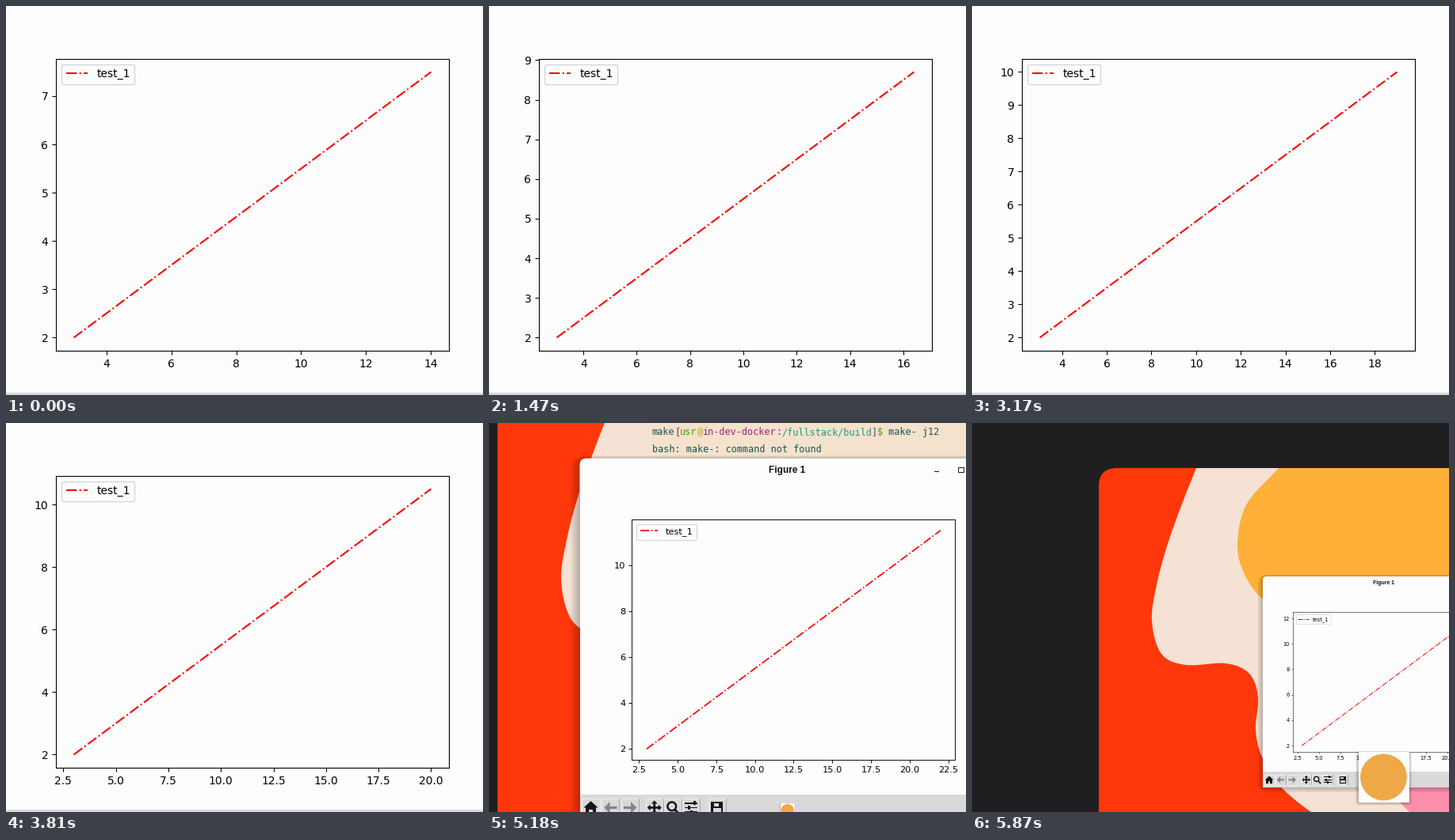
A matplotlib script for the animation above (5970 ms loop, 602 px wide and 492 px high).

```python
from itertools import count

import numpy as np
import matplotlib.pyplot as plt
from matplotlib.animation import FuncAnimation
from matplotlib.patches import (Annulus, Circle, FancyArrow, FancyBboxPatch,
                                Polygon, Rectangle)
from matplotlib.transforms import Affine2D

W, H, DPI = 602, 492, 100
LOOP, TICK = 5970, 30

PAPER, BAR, INK, GREY = "#fdfdfd", "#d9d9d9", "#141416", "#858585"
DARK, RED, CREAM, AMBER, PINK = "#1f1f22", "#fe380b", "#f5e2d5", "#feb038", "#fd8fab"
TERMINAL = "#f4e2cc"

STEP_START, STEP_MS = 38, 130.5
ZOOM_FROM, ZOOM_START, ZOOM_MS = 5180, 5127, 287.5

fig = plt.figure(figsize=(W / DPI, H / DPI), dpi=DPI, facecolor=DARK)


def layer(z):
    a = fig.add_axes([0, 0, 1, 1], zorder=z)
    a.set(xlim=(0, W), ylim=(H, 0))
    a.axis("off")
    return a


stage, front = layer(0), layer(2)
desk, term, win, icon = (Affine2D() for _ in range(4))
order = count(1)
backdrop = []


def add(patch, group, axes=stage):
    axes.add_patch(patch)
    patch.set_transform(group + axes.transData)
    patch.set_zorder(next(order))
    if group is not win:
        backdrop.append(patch)
    return patch


def rect(x, y, w, h, color, group, axes=stage):
    return add(Rectangle((x, y), w, h, fc=color, lw=0), group, axes)


def outline(x, y, w, h, color):
    add(Rectangle((x, y), w, h, fill=False, ec=color, lw=0.7), win)


def rounded(x, y, w, h, r, color, group, axes=stage, alpha=1):
    style = f"round,pad=0,rounding_size={r}"
    return add(FancyBboxPatch((x, y), w, h, boxstyle=style, fc=color, lw=0,
                              alpha=alpha), group, axes)


def shadow(x, y, w, h, r, group, spread, axes=stage):
    for d in spread * np.arange(1, 7) / 6:
        rounded(x - d, y - d * 0.3, w + 2 * d, h + 1.3 * d, r + d, "black",
                group, axes, alpha=0.04)


def smooth(points, n=12):
    """Catmull-Rom curve through the points."""
    p = np.array(points, float)
    p = np.vstack([2 * p[0] - p[1], p, 2 * p[-1] - p[-2]])
    t = np.linspace(0, 1, n)[:, None]
    return np.vstack([
        b + t * (c - a) / 2 + t**2 * (a - 2.5 * b + 2 * c - d / 2)
        + t**3 * (3 * (b - c) + d - a) / 2
        for a, b, c, d in zip(p, p[1:], p[2:], p[3:])])


def blob(points, top, bottom, color):
    """Region to the right of a smooth left edge."""
    edge = np.vstack([smooth(points), [(1100, bottom), (1100, top)]])
    return add(Polygon(edge, fc=color, lw=0), desk)


# wallpaper
rounded(0, 0, 1100, 800, 23, RED, desk)
blob([(123, 0), (104, 48), (86, 99), (73, 148), (67, 193), (79, 235), (110, 249),
      (160, 247), (190, 260), (201, 290), (198, 330), (205, 363), (225, 398),
      (268, 435), (330, 470)], 0, 470, CREAM)
blob([(227, 0), (187, 45), (175, 93), (182, 130), (207, 166), (260, 200)], 0, 200, AMBER)
pink = blob([(358, 395), (380, 423), (420, 460)], 395, 460, PINK)

# terminal, measured in line heights
rect(0, -2, 100, 1.4, PAPER, term)
rect(0, -0.6, 100, 33.3, TERMINAL, term)
rect(0, 31.9, 100, 0.7, "#dfe08a", term)

TEAL, GREEN, PLUM, SEA, OLIVE = "#1c5458", "#4f9a10", "#a0207c", "#1f9f80", "#b0a010"
PROMPT = [("[", PLUM), ("usr", GREEN), ("@", OLIVE), ("in-dev-docker", PLUM),
          (":", TEAL), ("/fullstack/build", SEA), ("]", PLUM), ("$", GREEN)]
LINES = [
    [("make", TEAL), *PROMPT, (" make- j12", TEAL)],
    [("bash: make-: command not found", TEAL)],
    [*PROMPT, (" make -j12", TEAL)],
    [("[  9%] ", TEAL), ("Built target core", GREEN)],
    [("[10%] ", TEAL), ("Built target util", GREEN)],
    [("[10%] ", TEAL), ("Built target main", GREEN)],
    [*PROMPT, (" ls", TEAL)],
    [("s 2", TEAL)],
    [("DV", TEAL)],
]


def label(s, color, **kw):
    return stage.text(0, 0, s, color=color, va="center", zorder=next(order), **kw)


words = []
for row, parts in enumerate(LINES):
    col = 0
    for s, color in parts:
        words.append((label(s, color, family="DejaVu Sans Mono"), row, col))
        col += len(s)
backdrop += [w[0] for w in words]

# figure window
shadow(0, 0, 640, 557, 10, win, 14)
rounded(0, 0, 640, 60, 10, PAPER, win)
rect(0, 30, 640, 487, PAPER, win)
rect(0, 516.5, 640, 40.5, BAR, win)
rect(544, 20, 7.5, 1.4, INK, win)
outline(581, 14, 7.5, 7.5, INK)
title = label("Figure 1", INK, family="Liberation Sans", weight="bold", ha="center")

# toolbar
CY = 537


def box(cx, x, y, w, h, color=INK):
    rect(cx + x, CY + y, w, h, color, win)


def arrow(cx, dx, dy, width, head, color=INK, back=0):
    add(FancyArrow(cx - back * dx, CY - back * dy, dx * (1 + back), dy * (1 + back),
                   width=width, head_width=head, head_length=head / 2,
                   length_includes_head=True, fc=color, lw=0), win)


home, prev, following = 17 + 30.2 * np.arange(3)
move, zoom, tune = 114.5 + 28.3 * np.arange(3)
save = 210.5
for cx in (home, prev, following, move, zoom, tune, save):
    outline(cx - 13.5, CY - 14, 27, 28, "#efefef")
    box(cx, 13.5, -14, 0.9, 28, "#a8a8a8")

add(Polygon([(home - 11, CY), (home, CY - 10), (home + 11, CY)], fc=INK, lw=0), win)
box(home, -8, 0, 5.5, 9)
box(home, 2.5, 0, 5.5, 9)
box(home, -3, 0, 6, 3)
for cx, dx in ((prev, -10), (following, 10)):
    arrow(cx, dx, 0, 4, 18, GREY, back=1)
for angle in np.arange(4) * np.pi / 2:
    arrow(move, 11 * np.cos(angle), 11 * np.sin(angle), 3.4, 9.5)
add(Annulus((zoom - 1.5, CY - 2), 8, 3, fc=INK, lw=0), win)
add(FancyArrow(zoom + 3, CY + 3, 7, 7, width=3.4, head_width=0, head_length=0,
               fc=INK, lw=0), win)
for i in range(3):
    y, knob = 7 * (i - 1), 5 * np.cos(2.4 * i)
    box(tune, -10, y - 1, 20, 2)
    box(tune, knob - 2, y - 3, 4, 6)
box(save, -9, -9, 18, 18)
box(save, -5, -7, 8, 5, BAR)
box(save, -6, 1, 12, 6, BAR)

# app tile, one unit wide
shadow(-0.5, -0.5, 1, 1, 0.02, icon, 0.06, front)
rect(-0.5, -0.5, 1, 1, PAPER, icon, front)
add(Circle((0, 0), 0.46, fc="#efa848", lw=0), icon, front)

# chart
ax = fig.add_axes([0.1, 0.1, 0.8, 0.8], zorder=1, facecolor=PAPER)
line, = ax.plot([], [], "r-.", label="test_1")


def restyle(s):
    ax.tick_params(labelsize=10 * s, length=3.5 * s, width=0.8 * s, pad=3.5 * s)
    for spine in ax.spines.values():
        spine.set_linewidth(0.8 * s)
    line.set_linewidth(1.5 * s)
    frame = ax.legend(loc="upper left", fontsize=10 * s, facecolor=PAPER).get_frame()
    frame.set_linewidth(s)


def place_window(left, top, s):
    win.clear().scale(s).translate(left, top)
    title.set_position((left + 318.5 * s, top + 18 * s))
    title.set_fontsize(10.4 * s)
    x, y = left + 80 * s, top + 94.1 * s
    w, h = 496 * s, 369.6 * s
    ax.set_position([x / W, 1 - (y + h) / H, w / W, h / H])


def plot_to(end):
    x = np.array([3, end])
    y = x / 2 + 0.5
    line.set_data(x, y)
    for setter, v in ((ax.set_xlim, x), (ax.set_ylim, y)):
        pad = 0.05 * (v[1] - v[0])
        setter(v[0] - pad, v[1] + pad)


def place_backdrop(u):
    desk.clear().scale(1 + 0.2 * u).translate(160 - 158 * u + 9 * u * u, 57 - 88 * u)
    pink.set_alpha(max(0, 1 - 4.2 * u))

    pitch, cell = 10.4 + 11.6 * u, 3.3 + 3.8 * u
    x0, y0 = 711 - 506 * u, 64.5 - 52.5 * u
    term.clear().scale(pitch).translate(x0, y0)
    for word, row, col in words:
        word.set_position((x0 + 1.5 + col * cell, y0 + row * pitch))
        word.set_fontsize(cell / 0.602 * 72 / DPI)

    icon.clear().scale(64 - 46 * u).translate(519.5 - 142.5 * u,
                                              448 + 50 * u - 8 * u * u)


def update(i):
    t = i * TICK + 20
    zoomed = t >= ZOOM_FROM
    for artist in backdrop:
        artist.set_visible(zoomed)
    if zoomed:
        # u runs down to 0 as the overview settles
        u = 1.506 * max(0, 1 - (t - ZOOM_START) / ZOOM_MS) ** 2
        place_backdrop(u)
        s = 0.479 + 0.343 * u
        place_window(367 - 252 * u, 194 - 143 * u - 6 * u * u, s)
    else:
        s = 1
        place_window(-17, -27.5, s)
    plot_to(14 + 0.2 * np.floor((t - STEP_START) / STEP_MS + 1))
    restyle(s)
    return []


anim = FuncAnimation(fig, update, frames=LOOP // TICK, interval=TICK,
                     init_func=lambda: update(0), repeat=True, repeat_delay=0,
                     blit=False)
plt.show()
```
